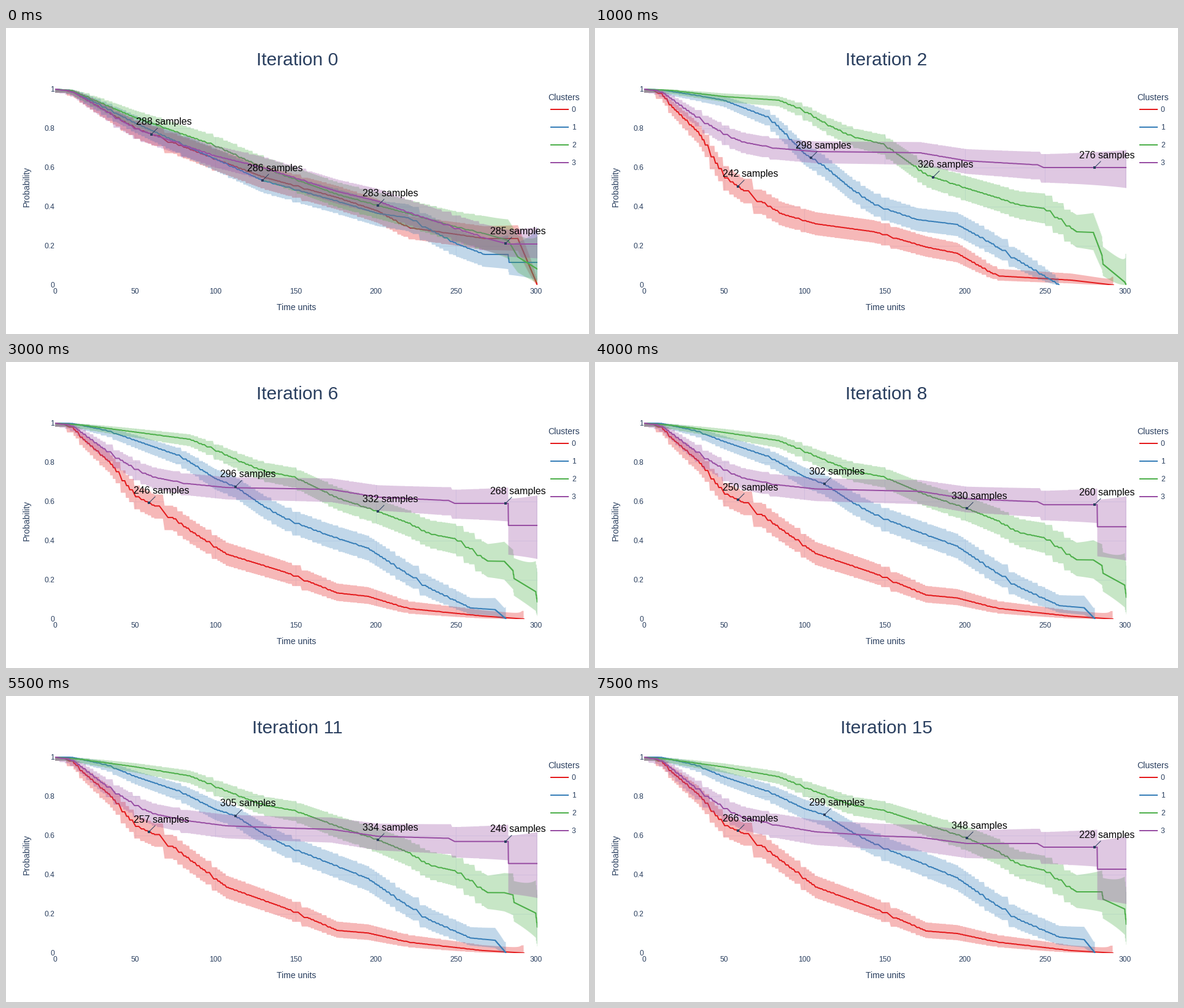
Animation, 950 px wide and 500 px high, one loop 8000 ms. Source, as a matplotlib script:

```python
import numpy as np
import matplotlib.pyplot as plt
from matplotlib.animation import FuncAnimation
from matplotlib.patches import Rectangle

W, H, DPI = 950, 500, 100
FRAMES, STEP_MS = 16, 500
PX = 72 / DPI
LEFT, RIGHT, TOP, BOTTOM = 80, 866, 100, 420
UNIT = 2.6135  # pixels per time unit
INK, GRID = "#2a3f5f", "#ebf0f8"
XS = np.arange(LEFT, RIGHT + 1)
TOTAL = 1142
DROP_X = 818

# Knots shared by the four nearly equal curves before clustering starts.
START_X = [80, 107, 210, 341, 418, 540, 606, 655, 733, 780, 818, 820, 834, 866]

plt.rcParams["font.family"] = "Liberation Sans"


class Cluster:
    """A survival curve that separates quickly, then settles towards its last shape."""

    def __init__(self, color, seed, tau, censor, anchor, start, x, early, late, drop=0):
        self.color, self.tau, self.censor, self.anchor = color, tau, censor, anchor
        self.start = np.interp(XS, START_X, start)
        self.early, self.late = np.interp(XS, x, early), np.interp(XS, x, late)
        self.drop = drop
        ev = LEFT + np.cumsum(2 + np.random.default_rng(seed).geometric(.28, 200))
        self.events = np.concatenate([[LEFT], ev[ev < 780], np.arange(780, RIGHT + 1)])

    def curve(self, i):
        if i < 2:
            w = np.interp(i, [0, 1, 2], [0, .65, 1])
            return self.start * (1 - w) + self.early * w
        w = (1 - np.exp(-(i - 2) / self.tau)) / (1 - np.exp(-13 / self.tau))
        y = self.early * (1 - w) + self.late * w
        return y + self.drop * (XS > DROP_X) * (i > 4)

    def band(self, y, i, n):
        """Log-log confidence limits, with fewer samples at risk over time."""
        s = np.clip((BOTTOM - y) / (BOTTOM - TOP), .001, .996)
        risk = 1 - self.censor * ((XS - LEFT) / (RIGHT - LEFT)) ** 3
        if self.drop and i > 4:
            risk[XS > DROP_X] *= .37
        se = 1.96 * np.sqrt(s * (1 - s) / (n * risk))
        theta = np.minimum(se / (-s * np.log(s)), 1.5)
        limits = [s ** np.exp(-theta), s ** np.exp(theta)]
        return [np.where(y < BOTTOM - .1, BOTTOM - (BOTTOM - TOP) * p, BOTTOM) for p in limits]


clusters = [
    Cluster("#e41a1c", 1, 3, .5, [237, 233, 233],
            [100, 103, 163, 214, 243, 277, 299, 326, 337, 344, 344, 344, 344, 420],
            [80, 105, 125, 170, 210, 250, 305, 360, 455, 540, 590, 655, 776, 845],
            [100, 103, 128, 172, 242, 271, 304, 320, 333, 358, 368, 405, 412, 420],
            [100, 103, 124, 162, 210, 228, 270, 312, 347, 384, 388, 402, 416, 420]),
    Cluster("#377eb8", 2, 3.5, .93, [418, 352, 374],
            [100, 102, 155, 214, 249, 283, 303, 310, 352, 370, 370, 383, 383, 383],
            [80, 107, 165, 210, 285, 341, 374, 418, 458, 525, 590, 643, 690, 757, 797, 815],
            [100, 101, 110, 118, 147, 205, 226, 263, 290, 313, 321, 350, 380, 420, 420, 420],
            [100, 100, 113, 132, 157, 184, 194, 222, 243, 270, 297, 334, 365, 394, 398, 420]),
    Cluster("#4daf4a", 3, 5, .93, [606, 551, 606],
            [100, 102, 146, 192, 228, 272, 290, 303, 325, 336, 347, 350, 374, 394],
            [80, 125, 210, 300, 341, 375, 418, 471, 540, 606, 655, 690, 733, 785, 812, 826, 828, 863, 866],
            [100, 102, 112, 118, 135, 156, 177, 190, 240, 262, 277, 289, 295, 333, 334, 371, 386, 415, 420],
            [100, 104, 116, 132, 149, 162, 178, 187, 210, 232, 253, 275, 285, 320, 320, 320, 332, 348, 373]),
    Cluster("#984ea3", 4, -8, .65, [814, 814, 814],
            [100, 103, 164, 209, 228, 267, 283, 301, 327, 343, 353, 353, 353, 353],
            [80, 107, 165, 210, 240, 290, 360, 471, 530, 606, 727, 733],
            [100, 103, 145, 173, 186, 196, 202, 203, 204, 217, 224, 228],
            [100, 104, 151, 183, 198, 210, 222, 229, 231, 241, 241, 247], drop=36),
]

# Sizes of the first three clusters; the fourth takes the rest.
SIZE_AT = [0, 2, 4, 6, 10, 13, 15]
SIZES = [[288, 242, 238, 246, 255, 260, 266],
         [286, 298, 299, 296, 307, 300, 299],
         [283, 326, 326, 332, 329, 344, 348]]

fig = plt.figure(figsize=(W / DPI, H / DPI), dpi=DPI, facecolor="white")
ax = fig.add_axes([0, 0, 1, 1])


def stairs(x, y, ramp):
    """Steps halfway between samples; ramp is half the riser's share."""
    d = np.diff(x)
    px = np.column_stack([x[:-1], x[:-1] + d * (.5 - ramp), x[:-1] + d * (.5 + ramp)])
    py = np.column_stack([y[:-1], y[:-1], y[1:]])
    return np.append(px.ravel(), x[-1]), np.append(py.ravel(), y[-1])


def label(x, y, text, size, ha="center", color=INK):
    ax.text(x, y + .36 * size, text, fontsize=size * PX, ha=ha, va="baseline", color=color, zorder=20)


def draw_texts(i):
    label(475, 50.3, f"Iteration {i}", 30)
    for k in range(7):
        label(LEFT + 50 * k * UNIT, 429.5, str(50 * k), 12)
    for k in range(6):
        label(79, BOTTOM - 64 * k, f"{k / 5:g}", 12, "right")
    label(473, 456, "Time units", 14)
    ax.text(33.5, 259.5, "Probability", fontsize=14 * PX, rotation=90, ha="center", va="center", color=INK)
    label(883.5, 113, "Clusters", 14, "left")
    for k, c in enumerate(clusters):
        y = 132.6 + 29 * k
        ax.plot([887, 917], [y, y], color=c.color, lw=2 * PX, solid_capstyle="butt")
        label(922, y, str(k), 12, "left")


def draw_cluster(c, i, n, z, frame):
    y = c.curve(i)
    idx = c.events - LEFT
    (bx, by), (lx, ly) = [stairs(c.events, edge[idx], .05) for edge in c.band(y, i, n)]
    band, = ax.fill(np.append(bx, lx[::-1]), np.append(by, ly[::-1]),
                    color=c.color, alpha=.31, lw=0, zorder=z)
    grid = [ax.vlines(LEFT + 50 * UNIT * np.arange(1, 7), TOP, BOTTOM, color=GRID, lw=PX, zorder=0),
            ax.hlines(BOTTOM - 64 * np.arange(1, 5), LEFT, RIGHT, color=GRID, lw=PX, zorder=0)]
    for g in grid:
        g.set_clip_path(band)

    px, py = stairs(c.events, y[idx], .25)
    done = np.flatnonzero(py >= BOTTOM - .1)
    end = done[0] + 1 if done.size else len(px)
    line, = ax.plot(px[:end], py[:end], color=c.color, lw=2 * PX, zorder=z, solid_joinstyle="round")
    line.set_clip_path(frame)

    x = np.interp(i, [0, 2, 4], c.anchor)
    draw_label(x, np.interp(x, XS, y), n)


def draw_label(x, y, n):
    ax.plot([x, x + 10], [y, y - 10], color=INK, lw=PX, zorder=15)
    ax.add_patch(Rectangle((x - 2, y - 2), 4, 4, color=INK, lw=0, zorder=15))
    label(x + 20, y - 21, f"{n} samples", 16, color="black")


def update(i):
    ax.clear()
    ax.set(xlim=(0, W), ylim=(H, 0))
    ax.axis("off")
    frame = Rectangle((LEFT, TOP - 1), RIGHT - LEFT, BOTTOM - TOP + 1, fc="none", ec="none")
    ax.add_patch(frame)
    counts = [round(float(np.interp(i, SIZE_AT, row))) for row in SIZES]
    counts.append(TOTAL - sum(counts))
    for z, (c, n) in enumerate(zip(clusters, counts), 1):
        draw_cluster(c, i, n, z, frame)
    draw_texts(i)
    return []


anim = FuncAnimation(fig, update, frames=FRAMES, interval=STEP_MS, repeat=True, repeat_delay=0)
plt.show()
```
